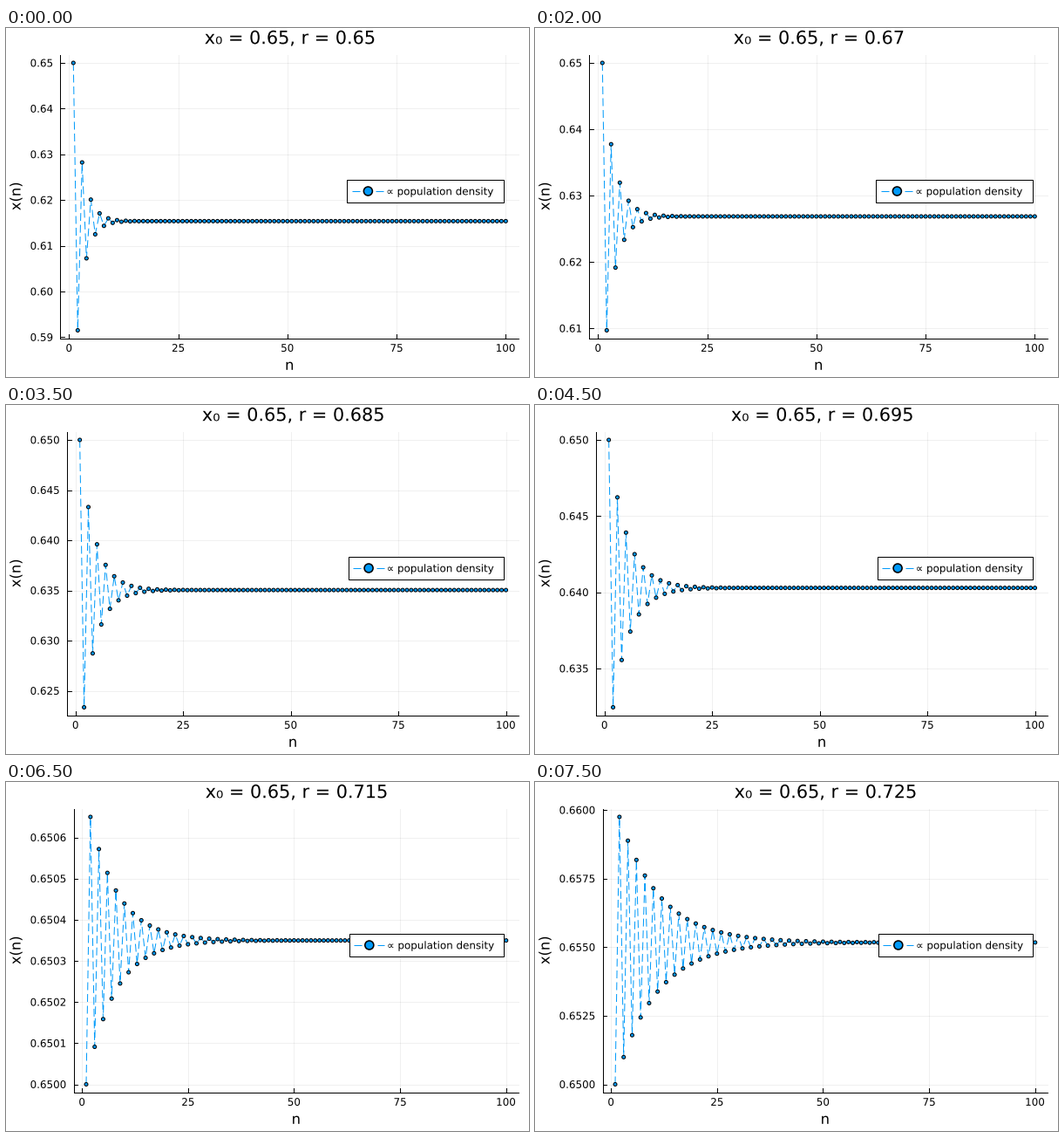
These frames come from a looping animation (600x400 px, 8000 ms). A matplotlib script:

```python
import math

import matplotlib.pyplot as plt
from matplotlib.animation import FuncAnimation
from matplotlib.patches import Circle, PathPatch, Rectangle
from matplotlib.textpath import TextPath
from matplotlib.transforms import Affine2D

W, H, DPI = 600, 400, 100
PX = 72 / DPI  # one pixel in points
BLUE = "#009afa"
TOP, BOTTOM, RIGHT = 30.8, 355.7, 588.2
TICK = 4.7
SMALL, MEDIUM, LARGE = 11.9, 16.35, 20.8
N, X0, COUNT = 100, 0.65, 16
STEPS = [0.01] * 7 + [0.005] * 4 + [0.002, 0.001, 0.0001, 0.001, 0.0025]

fig = plt.figure(figsize=(W / DPI, H / DPI), dpi=DPI, facecolor="white")
ax = fig.add_axes([0, 0, 1, 1])


def text(x, baseline, s, size, anchor=0.5, angle=0):
    """Place s so that the given fraction of its ink width sits at x."""
    path = TextPath((0, 0), s, size=size)
    box = path.get_extents()
    place = (Affine2D().translate(-box.x0 - anchor * box.width, 0)
             .scale(1, -1).rotate_deg(-angle).translate(x, baseline))
    ax.add_patch(PathPatch(path.transformed(place), fc="black", lw=0, zorder=6))


def line(xs, ys, color="black", width=1, z=3, **style):
    ax.plot(xs, ys, color=color, lw=width * PX, zorder=z, **style)


def dashed(xs, ys, z):
    line(xs, ys, BLUE, z=z, ls=(0, (9, 4.5)), dash_capstyle="butt")


def dot(x, y, radius, width, z):
    ax.add_patch(Circle((x, y), radius, fc=BLUE, ec="black", lw=width * PX, zorder=z))


def logistic(r):
    xs = [X0]
    while len(xs) < N:
        xs.append(4 * r * xs[-1] * (1 - xs[-1]))
    return xs


def legend(width):
    right = RIGHT - width / 30
    label = right - 0.0205 * width - 122.7
    end = label - 0.0075 * width
    start = end - 0.068 * width
    left = start - 0.0115 * width
    ax.add_patch(Rectangle((left, 174.2), right - left, 25.8, fc="white",
                           ec="black", lw=PX, zorder=5))
    dashed([start, end], [187, 187], 6)
    dot((start + end) / 2, 187, 5, 1.6, 7)
    text(label + 0.4, 191.3, "∝ population density", SMALL, 0)


def draw(i):
    for artist in [*ax.lines, *ax.patches]:
        artist.remove()

    r = round(0.65 + 0.005 * i, 3)
    step = STEPS[i]
    digits = next(d for d in range(2, 5) if abs(round(step, d) - step) < 1e-9)
    left = 62.4 + 7.57 * (digits - 2)
    width, middle = RIGHT - left, (left + RIGHT) / 2

    xs = logistic(r)
    pad = 0.03 * (max(xs) - min(xs))
    lo, hi = min(xs) - pad, max(xs) + pad
    n_lo, n_hi = 1 - 0.03 * (N - 1), N + 0.03 * (N - 1)

    def px(n):
        return left + (n - n_lo) / (n_hi - n_lo) * width

    def py(v):
        return BOTTOM - (v - lo) / (hi - lo) * (BOTTOM - TOP)

    for n in range(0, N + 1, 25):
        x = px(n)
        line([x, x], [TOP, BOTTOM], alpha=0.06, z=1)
        line([x, x], [BOTTOM, BOTTOM - TICK])
        text(x, 370.9, str(n), SMALL)
    for k in range(math.ceil(lo / step), math.floor(hi / step) + 1):
        y = py(k * step)
        line([left, RIGHT], [y, y], alpha=0.06, z=1)
        line([left, left + TICK], [y, y])
        text(28.4, y + 4.35, f"{k * step:.{digits}f}", SMALL, 0)
    line([left, left], [TOP, BOTTOM])
    line([left, RIGHT], [BOTTOM, BOTTOM])

    points = [(px(n), py(v)) for n, v in enumerate(xs, 1)]
    dashed(*zip(*points), 3.5)
    for x, y in points:
        dot(x, y, 2, 1, 4)

    legend(width)
    text(middle, 18.2, f"x₀ = {X0:g}, r = {r:g}", LARGE)
    text(middle, 391.8, "n", MEDIUM)
    text(16.6, (TOP + BOTTOM) / 2, "x(n)", MEDIUM, angle=90)

    ax.set_xlim(0, W)
    ax.set_ylim(H, 0)
    ax.axis("off")
    return []


anim = FuncAnimation(fig, draw, frames=COUNT, init_func=lambda: [],
                     interval=500, repeat=True, repeat_delay=0)
plt.show()
```
